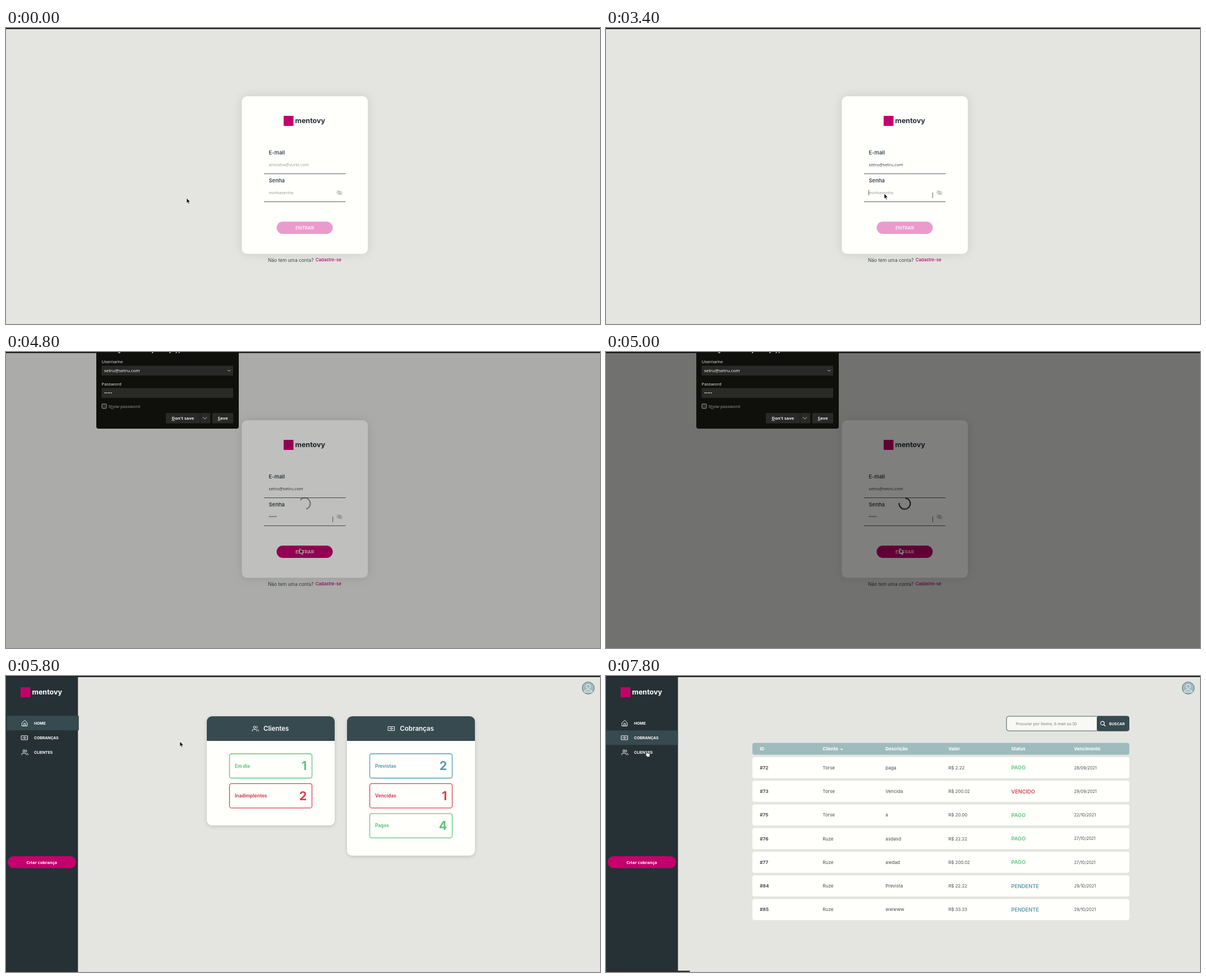
Write an HTML page that moves like this. It is 1059 by 529 pixels and loops after 8 s.

```html
<!DOCTYPE html>
<html lang="pt-BR">
<head>
<meta charset="utf-8">
<title>Painel</title>
<style>
html, body { margin: 0; width: 100%; height: 100%; overflow: hidden; background: #e4e5e1; }
svg { display: block; width: 100%; height: 100%; }
text { font-family: Inter, sans-serif; white-space: pre; }
.ui { font-family: "Noto Sans", sans-serif; }
.line { fill: none; stroke-linecap: round; stroke-linejoin: round; }
.card { filter: drop-shadow(0 2px 3px rgba(0, 0, 0, .14)); }
.login { filter: drop-shadow(0 0 9px rgba(0, 0, 0, .1)); }
u, .u { text-decoration: underline; }
</style>
</head>
<body>
<svg id="stage" viewBox="0 0 1059 529"></svg>
<script>
const LOOP = 8000, STEP = 100;
const INK = '#3b484d', SLATE = '#364a50', SIDE = '#263135', PINK = '#c4006c',
      TEAL = '#9fbbbe', PAPER = '#fffffc', GREEN = '#5ac57c', RED = '#d63f53', BLUE = '#5a9aae';

// Text is placed by the middle of its capitals.
const text = (x, cy, size, str, fill = INK, weight = 400, extra = '') =>
  `<text x="${x}" y="${cy + size * .36}" font-size="${size}" fill="${fill}" font-weight="${weight}" ${extra}>${str}</text>`;
const ui = (x, cy, size, str, fill, weight = 400, extra = '') =>
  text(x, cy, size, str, fill, weight, 'class="ui" ' + extra);
const rect = (x, y, x2, y2, fill, r = 0, extra = '') =>
  `<rect x="${x}" y="${y}" width="${x2 - x}" height="${y2 - y}" rx="${r}" fill="${fill}" ${extra}/>`;
const group = (id, body, extra = '') => `<g id="${id}" ${extra}>${body}</g>`;
const icon = (x, y, scale, body, color = '#fff', width = 2) =>
  `<g class="line" transform="translate(${x} ${y}) scale(${scale})" stroke="${color}" stroke-width="${width}">${body}</g>`;
const MIDDLE = 'text-anchor="middle"', END = 'text-anchor="end"';

const people = '<path d="M17 21v-2a4 4 0 0 0-4-4H5a4 4 0 0 0-4 4v2M23 21v-2a4 4 0 0 0-3-3.9M16 3.1a4 4 0 0 1 0 7.8"/><circle cx="9" cy="7" r="4"/>';
const cash = '<path d="M1 5h22v14H1zM5 12h1M18 12h1"/><circle cx="12" cy="12" r="3"/>';
const house = '<path d="M3 10 12 2l9 8v12H3zM9 22v-9h6v9"/>';
const lens = '<circle cx="10" cy="10" r="7"/><path d="m15 15 6 6"/>';
const eyeOff = '<path d="M1 12C6 4 18 4 23 12C18 20 6 20 1 12M3 3l18 18"/><circle cx="12" cy="12" r="4"/>';

const brand = (x, y, color) => rect(x, y, x + 17.5, y + 18, PINK) +
  text(x + 20.5, y + 8.7, 12.5, 'mentovy', color, 700);

const USER = 'setru@setru.com', DOTS = '•••••';

const login = () => rect(420.5, 122, 645, 403.5, PAPER, 9, 'class="login"') +
  brand(495, 157, '#272f35') +
  text(468.5, 223, 9.4, 'E-mail', INK, 600) +
  text(468.5, 273, 9.4, 'Senha', INK, 600) +
  ui(468.5, 244, 7.6, 'amostra@vurel.com', '#9a9d9b', 400, 'id="mailHint"') +
  ui(468.5, 244, 7.6, USER, INK, 400, 'id="mail"') +
  ui(468.5, 294, 7.5, 'minhasenha', '#9a9d9b', 400, 'id="passHint"') +
  ui(468.5, 294, 7.6, '', INK, 400, 'id="pass"') +
  rect(460, 260, 605.5, 261, '#59605f') + rect(460, 310, 605.5, 311, '#59605f') +
  icon(589, 289, .46, eyeOff, '#a2a3a0') +
  rect(582.2, 294, 583.1, 304, '#565a58', 0, 'id="bar"') +
  rect(468.3, 239, 469, 249, '#333', 0, 'id="caret"') +
  rect(482.5, 346, 582.5, 368, PINK, 11, 'id="enter"') +
  text(532.5, 357, 8.2, 'ENTRAR', '#fff', 550, MIDDLE) +
  text(467, 414.5, 8.4, 'Não tem uma conta?', INK) +
  text(551.7, 414.5, 7.8, 'Cadastre-se', '#bd0070', 500);

const options = [USER, 'dus@dus.com', 'dus@dus.comf', 'rebe@rtodmf', 'rebe@rtodmf.com', 'gux@gux.com'];
const menu = () => rect(468, 251.5, 605, 320.8, '#2b2c29') +
  rect(597, 252, 604.5, 320, '#1f2322') + rect(598.5, 254, 602.3, 273, '#858784', 1.8) +
  rect(469, 252.5, 597, 264.2, '#555653', 0, 'id="hover"') +
  options.map((o, i) => ui(472, 259 + 11.1 * i, 7.8, o, '#f4f4f2')).join('');

const prompt = () => rect(161, -10, 415, 137, '#0f100c', 4) +
  ui(170.5, -2.9, 8.2, 'Save login for mentovy.webtry.app?', '#eee', 600) +
  ui(170.5, 17, 7.8, 'Username', '#dededb') + rect(170.5, 24.5, 405, 42, '#292a27', 1) +
  ui(175, 33.5, 7.9, USER, '#f2f2f0') + icon(394, 30, .3, '<path d="m5 8 7 7 7-7"/>', '#ddd', 3) +
  ui(170.5, 57, 7.8, 'Password', '#dededb') + rect(170.5, 64.5, 405, 82, '#292a27', 1) +
  ui(175, 73, 7.6, DOTS, '#f2f2f0') +
  rect(171, 92.8, 179, 100.8, '#292a27', 1, 'stroke="#a9a9a5" stroke-width=".9"') +
  ui(182.5, 97, 7.7, 'S<tspan class="u">h</tspan>ow password', '#92938f') +
  rect(285, 109, 364, 127.5, '#292a27', 1) + rect(345.7, 109, 346.5, 127.5, '#11120f') +
  rect(368, 109, 405, 127.5, '#292a27', 1) +
  ui(295.5, 118.3, 7.6, '<tspan class="u">D</tspan>on\'t save', '#ececea', 700) +
  icon(349, 112.5, .46, '<path d="m5 9 7 7 7-7"/>', '#ddd') +
  ui(377.5, 118.3, 7.8, '<tspan class="u">S</tspan>ave', '#ececea', 700);

const nav = (label, cy, glyph, x) => icon(x, cy - 6, .5, glyph) + text(50, cy, 6.8, label, '#fff', 700);
const frame = () => rect(0, 0, 128.3, 529, SIDE) + brand(26, 20, '#fff') +
  rect(0, 71, 128.3, 97, SLATE, 0, 'id="active"') +
  nav('HOME', 84.3, house, 27.3) + nav('COBRANÇAS', 110.4, cash, 27) + nav('CLIENTES', 136.4, people, 27.5) +
  rect(3, 322, 125, 343.5, PINK, 10.7) + ui(63.8, 333, 7.5, 'Criar cobrança', '#fff', 600, MIDDLE) +
  `<circle cx="1038" cy="21.5" r="10.8" fill="${TEAL}" stroke="#52686d" stroke-width=".9"/>` +
  icon(1038, 21.5, 1, '<circle cy="-3" r="3.7"/><path d="M-6.8 6.8V6c0-4 13.6-4 13.6 0v.8z"/>', '#fff', 1);

const panel = (x, bottom, title, glyph, gx, tx, items) =>
  `<g class="card">${rect(x, 72, x + 228, bottom, PAPER, 9)}</g>` +
  `<path d="M${x} 116V81a9 9 0 0 1 9-9h210a9 9 0 0 1 9 9v35z" fill="${SLATE}"/>` +
  icon(gx, 88, .5, glyph) + text(tx, 94, 11.5, title, '#fff', 600) +
  items.map(([label, value, color], i) => {
    const top = 139 + 53.4 * i;
    return rect(x + 40.5, top, x + 187.5, top + 43.5, 'none', 3.5, `stroke="${color}" stroke-width="1.3"`) +
      text(x + 50, top + 21.7, 8.3, label, color, 650) +
      text(x + 178.3, top + 21.7, 21.5, '0', color, 700, `${END} data-count="${value}"`);
  }).join('');
const home = () =>
  panel(358, 267, 'Clientes', people, 438.5, 459, [['Em dia', 1, GREEN], ['Inadimplentes', 2, RED]]) +
  panel(608, 321, 'Cobranças', cash, 681, 702.3, [['Previstas', 2, BLUE], ['Vencidas', 1, RED], ['Pagas', 4, GREEN]]);

const cols = [274.3, 386.3, 498.3, 610.5, 722.5, 834.5];
const heads = ['ID', 'Cliente', 'Descrição', 'Valor', 'Status', 'Vencimento'];
const tones = { PAGO: GREEN, VENCIDO: RED, PENDENTE: BLUE };
const bills = [
  '#72|Torse|paga|R$ 2.22|PAGO|28/09/2021',
  '#73|Torse|Vencida|R$ 200.02|VENCIDO|29/09/2021',
  '#75|Torse|a|R$ 20.00|PAGO|22/10/2021',
  '#76|Ruze|asdasd|R$ 22.22|PAGO|27/10/2021',
  '#77|Ruze|awdad|R$ 200.02|PAGO|27/10/2021',
  '#84|Ruze|Prevista|R$ 22.22|PENDENTE|29/10/2021',
  '#85|Ruze|wwwww|R$ 33.33|PENDENTE|29/10/2021'
].map(line => line.split('|'));
const sizes = [8.2, 8.2, 8.2, 7.8, 9.2, 7.4], weights = [700, 400, 400, 400, 600, 400];

const bill = (cells, i) => {
  const cy = 164 + 42.25 * i;
  return rect(261, cy - 19, 933, cy + 18.7, PAPER, 4) +
    cells.map((c, k) => text(cols[k], cy, sizes[k], c, tones[c] || '#474d50', weights[k])).join('');
};
const charges = () =>
  rect(714, 72, 932.5, 98, '#f8f8f5', 4, `stroke="${SLATE}" stroke-width=".9"`) +
  rect(875, 71.6, 933, 98.4, SLATE, 4) +
  ui(730.8, 85.2, 7.1, '', '#747977', 400, 'id="searchHint"') +
  icon(880.5, 79.8, .46, lens, '#fff', 2.6) + text(897, 85.3, 6.7, 'BUSCAR', '#fff', 700) +
  rect(261, 119.5, 933, 140.7, TEAL, 4) +
  heads.map((h, i) => text(cols[i], 130, 8, h, '#fff', 700)).join('') +
  '<path d="M417.7 130h4.8l-2.4 2.6z" fill="#fff"/>' +
  group('rows', bills.map(bill).join(''));

const arrow = '<path d="M0 0v9.2l2.1-1.9 1.5 3.3 1.6-.7-1.5-3.2h2.9z" fill="#111" stroke="#fff" stroke-width=".7"/>';
const hand = '<path d="M1.2.5c.9-.5 1.5 0 1.5.8v3.1l3.4.7c.9.2 1.2.8 1.1 1.6l-.5 4.2H2.5L-.5 7.5c-.3-.9.6-1.3 1.2-.7V1.2z" fill="#fff" stroke="#222" stroke-width=".7"/>';

document.getElementById('stage').innerHTML =
  rect(0, 0, 1059, 529, '#e4e5e1') +
  group('loginPage', login() + group('menu', menu())) +
  group('app', frame() + group('homePage', home()) + group('chargesPage', charges())) +
  rect(0, 0, 1059, 2, '#252624') +
  rect(0, 0, 1059, 529, '#000', 0, 'id="shade"') +
  '<path id="spinner" class="line" stroke="#1d1e1c" stroke-width="2.1" style="stroke-linecap:butt"/>' +
  group('prompt', prompt()) +
  rect(0, 526.7, 149.5, 529, '#2c2d2b', 0, 'id="status"') +
  group('cursor', group('arrow', arrow) + group('hand', hand));

const $ = id => document.getElementById(id);
const show = (id, on) => $(id).setAttribute('display', on ? 'inline' : 'none');
const set = (id, key, value) => $(id).setAttribute(key, value);
const within = (t, a, b) => t >= a && t < b;

// Pointer moves: start, end, x, y
const moves = [
  [0, 0, 322, 304], [300, 500, 340, 297], [600, 1200, 501, 241], [1300, 1500, 506, 246],
  [2000, 2100, 507.5, 248], [2200, 2700, 512, 262], [2800, 3200, 503, 308], [3200, 3400, 496, 296],
  [4200, 4300, 567, 325], [4300, 4400, 515, 349], [4500, 4600, 524, 351.5], [5000, 5100, 440, 230],
  [5200, 5300, 293, 150], [5300, 5400, 337, 116], [5500, 5600, 312.5, 116], [5700, 5800, 310, 117],
  [6000, 6400, 150, 88], [6400, 6600, 46, 62], [6600, 6700, 70, 114.5],
  [7300, 7600, 69, 126.5], [7700, 7800, 71, 133.5]
];
function pointer(t) {
  let x = 0, y = 0;
  for (const [a, b, nx, ny] of moves) {
    if (t < a) break;
    const k = b > a ? Math.min(1, (t - a) / (b - a)) : 1;
    x += (nx - x) * k;
    y += (ny - y) * k;
  }
  return [x, y];
}

function arc(t) {
  const k = (t - 4700) / 300, start = 190 + 85 * k, sweep = Math.min(286, 190 + 80 * k);
  const point = deg => {
    const a = deg * Math.PI / 180;
    return `${532.5 + 10 * Math.cos(a)} ${270.8 + 10 * Math.sin(a)}`;
  };
  return `M${point(start)}A10 10 0 ${sweep > 180 ? 1 : 0} 1 ${point(start + sweep)}`;
}

function render(t) {
  const filled = t >= 2500, typed = Math.max(0, Math.min(5, (t - 3600) / STEP));
  const inApp = t >= 5100, onCharges = t >= 6900, loaded = t >= 7300;

  show('loginPage', !inApp);
  show('menu', within(t, 1500, 2500));
  show('hover', t >= 2100);
  show('mail', filled);
  show('mailHint', !filled);
  show('passHint', typed === 0);
  $('pass').textContent = DOTS.slice(0, typed);
  show('bar', t >= 400);
  show('caret', within(t, 1400, 3700));
  set('caret', 'x', within(t, 2500, 3300) ? 529.3 : 468.3);
  set('caret', 'y', t < 3300 ? 239 : 289);
  set('enter', 'fill', typed ? PINK : '#ea9bcd');

  const shade = within(t, 4600, 5100) ? [0, .06, .25, .43, .5][(t - 4600) / STEP] : 0;
  set('shade', 'opacity', shade);
  set('spinner', 'opacity', shade * 2);
  set('spinner', 'd', arc(t));
  show('prompt', within(t, 4600, 5800));

  show('app', inApp);
  show('homePage', !onCharges);
  show('chargesPage', onCharges);
  set('active', 'x', onCharges ? 0 : 1.5);
  set('active', 'y', onCharges ? 97.2 : 71);
  document.querySelectorAll('[data-count]').forEach(n => {
    n.textContent = t >= 5300 ? n.dataset.count : '0';
  });
  show('rows', loaded);
  $('searchHint').textContent = 'Procurar por Nome, E-mail ou ' + (loaded ? 'ID' : 'CPF');
  show('status', t >= 7600);
  set('status', 'width', t < 7800 ? 146 : 149.5);

  const onLink = t >= 6600;
  show('cursor', !within(t, 3700, 4300));
  show('arrow', !onLink);
  show('hand', onLink);
  set('cursor', 'transform', `translate(${pointer(t)})`);
}

const begin = performance.now();
function tick() {
  const t = (performance.now() - begin) % LOOP;
  render(Math.floor(t / STEP) * STEP);
  requestAnimationFrame(tick);
}
tick();
</script>
</body>
</html>
```
